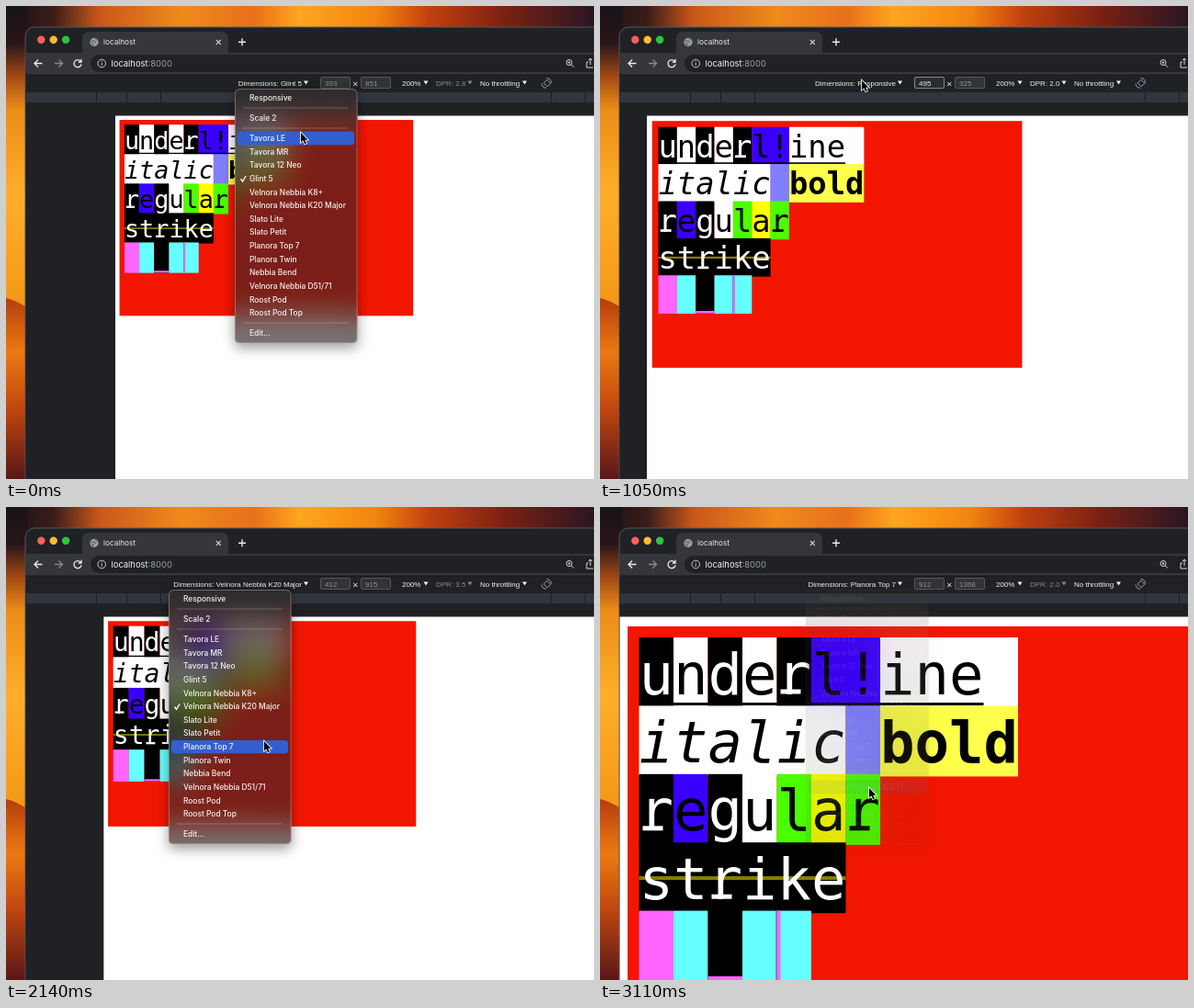
An HTML page with a canvas that plays this animation: 640 by 515 pixels, repeating every 3.14 s.

```html
<!DOCTYPE html>
<html lang="en">
<head>
<meta charset="utf-8">
<title>Responsive preview</title>
<style>
html, body { margin: 0; height: 100%; overflow: hidden; background: #202124; }
canvas { display: block; }
</style>
</head>
<body>
<canvas id="stage" width="640" height="515"></canvas>
<script>
const cv = document.getElementById('stage'), c = cv.getContext('2d');
const LOOP = 3140;
const UI = 'Inter, sans-serif', BAR = '"Liberation Sans", Arial, sans-serif';
const MONO = '"DejaVu Sans Mono", monospace';

// Device states: start time, menu row, viewport size, pixel ratio, menu left edge
const states = [
  { at: 0, row: 5, w: 393, h: 851, dpr: '2.8', menuX: 249 },
  { at: 270, row: 2, w: 375, h: 667, dpr: '2.0', menuX: 235.5 },
  { at: 950, row: 0, w: 495, h: 325, dpr: '2.0', menuX: 231 },
  { at: 1500, row: 7, w: 412, h: 915, dpr: '3.5', menuX: 177 },
  { at: 2270, row: 10, w: 912, h: 1368, dpr: '2.0', menuX: 224 }
];
const items = ['Responsive', 'Scale 2', 'Tavora LE', 'Tavora MR', 'Tavora 12 Neo', 'Glint 5',
  'Velnora Nebbia K8+', 'Velnora Nebbia K20 Major', 'Slato Lite', 'Slato Petit', 'Planora Top 7',
  'Planora Twin', 'Nebbia Bend', 'Velnora Nebbia D51/71', 'Roost Pod', 'Roost Pod Top', 'Edit...'];
const rowY = i => i < 2 ? 100 + 22 * i : i === 16 ? 356 : 144 + (i - 2) * 14.64;

// Menu: open time, start of fade
const menus = [[-1, 160], [640, 860], [1130, 1410], [1860, 2190], [2600, 3030]];
const FADE = 90;

// Pointer path: time, x, y
const path = [[0, 321, 138], [270, 320, 139], [620, 284, 83], [690, 284, 83], [780, 289, 97], [870, 289, 97],
  [960, 285, 80], [1150, 285, 82], [1370, 300, 214], [1500, 300, 214], [1640, 300, 140], [1790, 283, 83],
  [1880, 283, 83], [2070, 281, 255], [2220, 281, 255], [2360, 282, 63], [2480, 285, 82], [2620, 285, 82],
  [2920, 293, 306], [3140, 293, 306]];

const colors = { K: '#000', W: '#fff', B: '#3a00ff', P: '#8080ff', L: '#fdff4a', Y: '#ffff00',
  G: '#4bff00', M: '#ff66ff', C: '#66ffff' };
const lines = [
  ['underl!ine ', 'KWKWKBBWWWW'],
  ['italic bold', 'WWWWWWPLLLL'],
  ['regular', 'KBKWGYG'],
  ['strike', 'KKKKKK'],
  ['     ', 'MCKCC']
];

function rect(x, y, w, h, fill) { c.fillStyle = fill; c.fillRect(x, y, w, h); }

function round(x, y, w, h, r, fill) {
  c.beginPath();
  c.roundRect(x, y, w, h, r);
  if (fill) { c.fillStyle = fill; c.fill(); }
}

function text(s, x, y, font, fill = '#fff', align = 'left') {
  c.font = font;
  c.fillStyle = fill;
  c.textAlign = align;
  c.textBaseline = 'alphabetic';
  c.fillText(s, x, y);
}

function stroke(d, color, width = 1.2) {
  c.strokeStyle = color;
  c.lineWidth = width;
  c.stroke(new Path2D(d));
}

function disc(x, y, r, fill) {
  c.beginPath();
  c.arc(x, y, r, 0, 7);
  c.fillStyle = fill;
  c.fill();
}

function fade(x0, y0, x1, y1, stops) {
  const g = c.createLinearGradient(x0, y0, x1, y1);
  stops.forEach(([p, col]) => g.addColorStop(p, col));
  return g;
}

function wallpaper() {
  rect(0, 0, 640, 26, fade(0, 0, 640, 20, [[0, '#17131a'], [.08, '#3a1c18'], [.16, '#c9581a'], [.3, '#f08a1c'],
    [.42, '#e8701a'], [.5, '#ffa51f'], [.63, '#f2850f'], [.72, '#c2400d'], [.85, '#7a2012'], [1, '#2a1524']]));
  rect(0, 0, 24, 515, fade(0, 0, 0, 515, [[0, '#17131a'], [.08, '#2a1518'], [.15, '#a34a14'], [.22, '#ec8d18'],
    [.4, '#ffae2a'], [.61, '#f59a18'], [.75, '#f08a14'], [.85, '#d9560f'], [1, '#651a18']]));
  c.fillStyle = fade(0, 318, 0, 515, [[0, '#b53c0c'], [.3, '#ec7a12'], [.6, '#c2480f'], [1, '#5a1618']]);
  c.fill(new Path2D('M0 318Q12 321 24 329V515H0Z'));
}

function arrowDown(x, y, fill) {
  c.fillStyle = fill;
  c.fill(new Path2D(`M${x} ${y - 2}h5l-2.5 4z`));
}

function sizeBox(x, value, active) {
  round(x + .5, 77.5, 32, 12, 1.5, active ? '#2b2c2f' : '#323336');
  c.strokeStyle = active ? '#85888c' : '#55575b';
  c.lineWidth = 1;
  c.stroke();
  text(value, x + 5, 87, '8px ' + BAR, active ? '#eee' : '#8e9195');
}

function browser(s) {
  // Tab strip
  round(21, 23, 640, 520, 10, '#202124');
  c.strokeStyle = '#55565a';
  c.lineWidth = 1;
  c.stroke();
  round(83, 28, 159, 30, 7, '#35363a');
  ['#ff5f57', '#febc2e', '#28c840'].forEach((col, i) => disc(38.3 + i * 13.4, 36.7, 4.2, col));
  disc(96, 39.3, 4.6, '#9aa0a6');
  stroke('M92.5 38h4l1 2M95 43v-2l-2-1M97 35.5l2 2', '#4b4e53', 1);
  text('localhost', 106, 42.2, '8.2px ' + UI, '#e8eaed');
  stroke('M228.8 36.8l5 5m0-5l-5 5', '#d5d7da');
  stroke('M257 35.2v8m-4-4h8', '#e8eaed', 1.4);

  // Address bar
  rect(21.5, 51, 619, 24, '#35363a');
  round(92, 53, 580, 19, 9.5, '#202124');
  stroke('M39.5 62.5H31m4-4l-4 4 4 4', '#e8eaed', 1.3);
  stroke('M53 62.5h8.5m-4-4l4 4-4 4', '#85888c', 1.3);
  stroke('M81.2 60.2A4 4 0 1 0 82 63.3M82 57.8v3.2h-3.2', '#e8eaed', 1.3);
  stroke('M108.5 62.5a4.3 4.3 0 1 0-8.6 0a4.3 4.3 0 1 0 8.6 0M104.2 61.8v3M104.2 59.8v1', '#c8cacd', 1);
  text('localhost', 114.5, 65.8, '9.4px ' + UI, '#f1f3f4');
  const hostW = c.measureText('localhost').width;
  text(':8000', 114.5 + hostW, 65.8, '9.4px ' + UI, '#9aa0a6');
  stroke('M616 61.5a3 3 0 1 0-6 0a3 3 0 1 0 6 0M615.2 63.8l3 3M611.7 61.5h2.6M613 60.2v2.6', '#d5d7da', 1);
  stroke('M634 61h-2v6h7M636 64v-7m-2 2l2-2 2 2', '#d5d7da', 1);

  // Device toolbar
  rect(21.5, 75, 619, 440, '#202124');
  rect(21.5, 74.5, 619, 1, '#17181a');
  rect(21.5, 94, 619, 11, '#31353e');
  [98, 131, 168, 593, 630].forEach(x => rect(x, 94, 1, 11, '#1a1c20'));
  const free = s.row === 0, dim = free ? '#eee' : '#85888c', f = '8px ' + BAR;
  text('Dimensions: ' + items[s.row], 322, 86.6, f, '#f1f3f4', 'right');
  arrowDown(324, 83.5, '#f1f3f4');
  sizeBox(342, s.w, free);
  sizeBox(386, s.h, false);
  stroke('M378.2 82.8l4.2 4.2m0-4.2l-4.2 4.2', '#e8eaed', 1);
  text('200%', 431, 86.6, f, '#f1f3f4');
  arrowDown(454.5, 83.5, '#f1f3f4');
  text('DPR: ' + s.dpr, 468, 86.6, f, dim);
  arrowDown(502.5, 83.5, dim);
  text('No throttling', 516, 86.6, f, '#f1f3f4');
  arrowDown(562, 83.5, '#f1f3f4');
  stroke('M585.2 83.8l3.6-3.6 4 4-3.6 3.6zM583 84.5a5.3 5.3 0 0 0 5 4.8M593.5 83.5a5.3 5.3 0 0 0-5-5', '#9aa0a6', 1);
}

function page(w) {
  const left = Math.max(19.5, 381 - w * 2 / 3), cell = 37.5, step = 74.4;
  c.save();
  c.beginPath();
  c.rect(21.5, 119, 619, 396);
  c.clip();
  rect(left, 119.5, w * 4 / 3, 400, '#fff');
  c.translate(left, 119.5);
  c.scale(w / 912, w / 912);
  rect(10.5, 10.5, 742, 495, '#f21600');
  c.translate(23, 22.5);
  lines.forEach(([str, bg], r) => {
    const y = r * step;
    // Neighbouring cells of one colour form a single block
    for (const run of bg.matchAll(/(.)\1*/g))
      rect(run.index * cell, y, run[0].length * cell, 77, colors[run[1]]);
  });
  rect(0, 71, 10 * cell, 3, '#000');
  rect(0, 260, 6 * cell, 4, '#857d00');
  rect(2 * cell, 369, cell, 5, colors.M);
  rect(4 * cell, 4 * step, 4, 77, colors.M);
  rect(4 * cell - 1, 4 * step, 1, 77, '#448');
  lines.forEach(([str, bg], r) => [...str].forEach((ch, i) => {
    const base = r * step + 61.5, x = i * cell;
    const style = r === 1 ? (i < 6 ? 'italic ' : 'bold ') : '';
    text(ch, x, base, style + '62.3px ' + MONO, bg[i] === 'K' ? '#fff' : '#000');
    if (ch === 'r') c.fillRect(x + 4, base - 5, 22, 5);
  }));
  c.restore();
}

function menu(s, alpha, py) {
  const x = s.menuX, y = 90, w = 133.5, h = 277;
  c.save();
  c.globalAlpha = alpha;

  // Shadow outside the panel only
  c.save();
  c.beginPath();
  c.rect(0, 0, 640, 515);
  c.roundRect(x, y, w, h, 5);
  c.clip('evenodd');
  c.shadowColor = 'rgba(0,0,0,.4)';
  c.shadowBlur = 14;
  c.shadowOffsetY = 5;
  round(x, y, w, h, 5, '#000');
  c.restore();

  c.save();
  round(x, y, w, h, 5);
  c.clip();
  c.filter = 'blur(16px) saturate(1.2)';
  c.drawImage(cv, 0, 0);
  c.filter = 'none';
  rect(x, y, w, h, 'rgba(45,41,41,.62)');
  c.restore();
  round(x + .5, y + .5, w - 1, h - 1, 5);
  c.strokeStyle = 'rgba(190,180,180,.45)';
  c.lineWidth = 1;
  c.stroke();

  [111, 133, 345].forEach(sy => rect(x + 9, sy - .5, w - 19, 1, 'rgba(255,255,255,.22)'));
  items.forEach((name, i) => {
    const ry = rowY(i);
    if (Math.abs(py - ry) < 7.3) round(x + 3, ry - 7.2, w - 6.5, 14.4, 3, '#335fce');
    text(name, x + 16, ry + 3, '500 8.4px ' + UI, '#f5f2f2');
    if (i === s.row) stroke(`M${x + 6.5} ${ry + .3}l2 2.8 3.6-6`, '#fff', 1.3);
  });
  c.restore();
}

function pointer(x, y, open) {
  if (!open && y > 119) {
    disc(x, y, 6.3, 'rgba(90,90,90,.7)');
  } else if (!open && y > 53 && y < 72) {
    const beam = `M${x - 2.5} ${y - 5.5}q2.5 0 2.5 2v8q0 2-2.5 2M${x + 2.5} ${y - 5.5}q-2.5 0-2.5 2v8q0 2 2.5 2M${x - 1.5} ${y + 2}h3`;
    stroke(beam, '#222', 2);
    stroke(beam, '#eee', 1);
  } else {
    const p = new Path2D(`M${x} ${y}v10.5l2.4-2.2 1.7 3.9 1.8-.8-1.7-3.7h3.3z`);
    c.lineWidth = 1.6;
    c.strokeStyle = '#fff';
    c.stroke(p);
    c.fillStyle = '#000';
    c.fill(p);
  }
}

function pointerAt(t) {
  const i = path.findIndex(p => p[0] > t), a = path[i - 1], b = path[i];
  const k = (t - a[0]) / (b[0] - a[0]), e = k * k * (3 - 2 * k);
  return [a[1] + (b[1] - a[1]) * e, a[2] + (b[2] - a[2]) * e];
}

function draw(now) {
  const t = now % LOOP;
  const s = states.findLast(v => v.at <= t);
  const [x, y] = pointerAt(t);
  const shown = menus.find(([a, b]) => t >= a && t < b + FADE);
  wallpaper();
  browser(s);
  page(s.w);
  if (shown) menu(s, Math.min(1, (shown[1] + FADE - t) / FADE), y);
  pointer(x, y, !!shown);
}

const start = performance.now();
function tick() {
  draw(performance.now() - start);
  requestAnimationFrame(tick);
}
tick();
</script>
</body>
</html>
```
